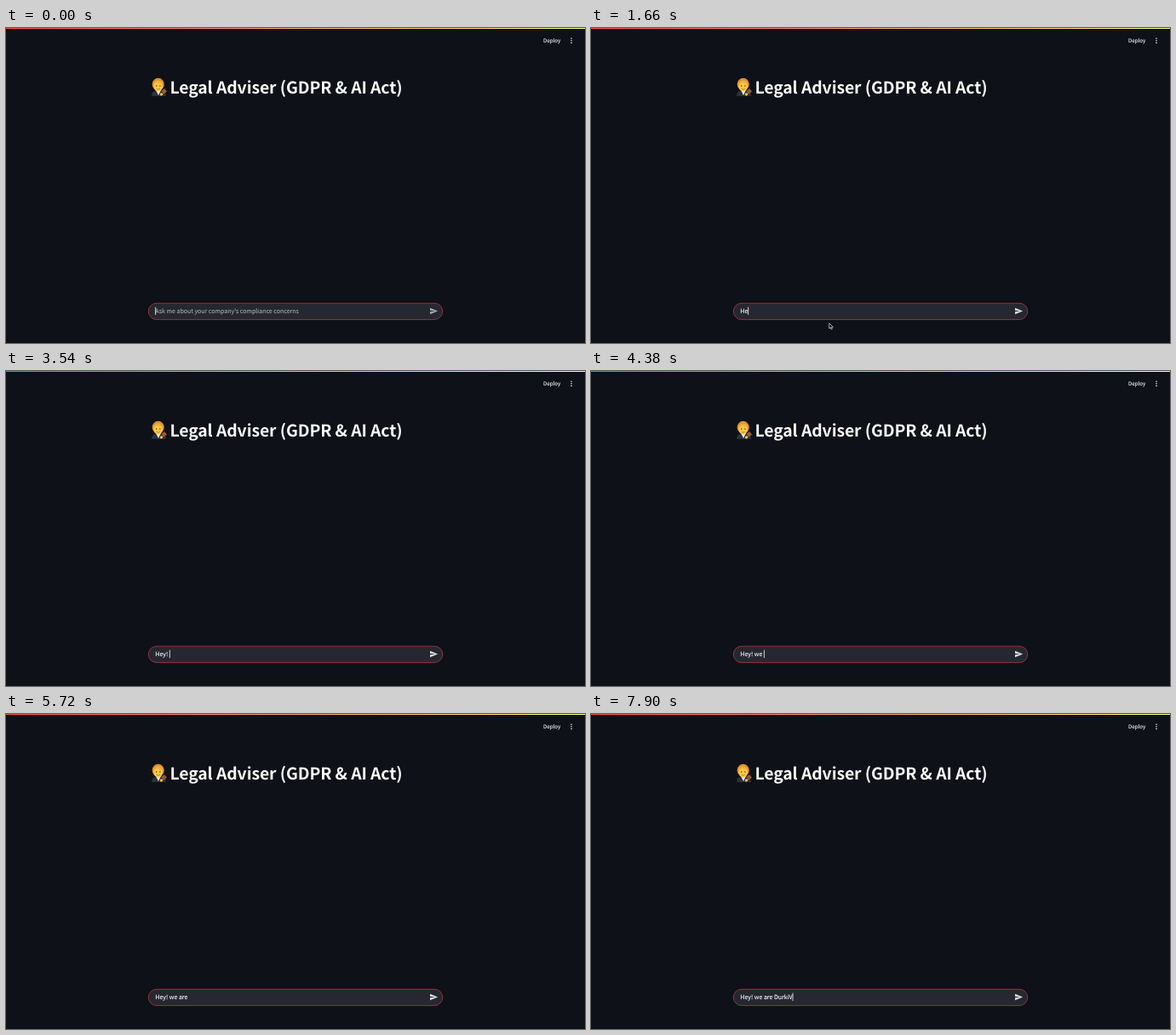
Animation, 680 px wide and 370 px high, one loop 8 s. Source, as an HTML page:

```html
<!DOCTYPE html>
<html lang="en">
<head>
<meta charset="utf-8">
<title>Legal Adviser</title>
<style>
  html, body { margin: 0; width: 100%; height: 100%; overflow: hidden; background: #0e1117; }
  svg { display: block; width: 680px; height: 370px; }
  text {
    font-family: "Noto Sans CJK JP", "Noto Sans CJK SC", "Noto Sans CJK KR", "Noto Sans CJK TC", "Noto Sans CJK", "Open Sans", sans-serif;
    fill: #fafafa; text-rendering: geometricPrecision; white-space: pre;
  }
  .small { stroke: #fafafa; stroke-width: .12px; }
</style>
</head>
<body>
<svg viewBox="0 0 680 370">
  <defs>
    <linearGradient id="bar">
      <stop stop-color="#ff4b4b"/>
      <stop offset="1" stop-color="#fffd80"/>
    </linearGradient>
  </defs>
  <rect width="680" height="370" fill="#0e1117"/>
  <rect width="680" height="1" fill="url(#bar)"/>

  <text class="small" x="631" y="17" font-size="6.16">Deploy</text>
  <g fill="#e6e6e8">
    <circle cx="664" cy="12.2" r=".8"/>
    <circle cx="664" cy="14.8" r=".8"/>
    <circle cx="664" cy="17.4" r=".8"/>
  </g>

  <!-- judge emoji -->
  <path d="M171 80c0-5 3-7 8.500-7s8.500 2 8.500 7z" fill="#2b303a"/>
  <path d="M176 73l3 6 3-6z" fill="#e8e8ea"/>
  <ellipse cx="178.700" cy="66" rx="7.100" ry="7.200" fill="#dd932c"/>
  <ellipse cx="178.700" cy="68.500" rx="5.300" ry="6" fill="#ffc843"/>
  <path d="M173 66.500c1-6 9-7 11.500-1-4 .5-6-1.500-7-1.500s-2 2-4.500 2.500z" fill="#f0ae40"/>
  <g fill="#57391c">
    <circle cx="176.700" cy="68" r=".8"/>
    <circle cx="180.900" cy="68" r=".8"/>
  </g>
  <path d="M176.800 71.500q1.900 1.300 3.800 0" fill="none" stroke="#8a5a22" stroke-width=".7"/>
  <path d="M182.500 74l3.500-3 3 3.500-3.500 3z" fill="#a0582f"/>
  <path d="M185 76l-3.500 3.500" stroke="#a0582f" stroke-width="1.500"/>
  <circle cx="182.500" cy="77.800" r="1.600" fill="#ffc843"/>

  <text x="192.500" y="77" font-size="19.360" font-weight="700" letter-spacing="-.1">Legal Adviser (GDPR &amp; AI Act)</text>

  <rect x="167.250" y="323.250" width="345.500" height="19.200" rx="9.600" fill="#262730" stroke="#f0494b" stroke-width=".55"/>
  <text id="entry" class="small" x="175.300" y="334.700" font-size="7.020"></text>
  <rect id="caret" y="327.700" width=".8" height="9.300" fill="#fafafa"/>
  <path id="send" d="M498 328.700L507.200 332.500 498 336.300V333.300L504 332.500 498 331.700z"/>
  <path id="pointer" d="M0 0V6.300L1.500 5 2.500 7.200 3.500 6.700 2.600 4.600H4.500z" fill="#0b0c10" stroke="#e8e8e8" stroke-width=".7"/>
</svg>
<script>
const LOOP = 8000;
const HINT = "Ask me about your company's compliance concerns";
const MESSAGE = "Hey! we are DurkiV";
// moment at which each character of MESSAGE appears
const KEYS = [860, 1660, 2600, 3360, 3540, 3920, 4220, 4380, 4560, 4840,
              5040, 5220, 6020, 6260, 6440, 7260, 7740, 7900];
const BLINK = 500, FIRST_BLINK = 400;
const [entry, caret, send, pointer] =
  ["entry", "caret", "send", "pointer"].map(id => document.getElementById(id));

let shown;
function setText(count) {
  if (count === shown) return;
  shown = count;
  entry.textContent = count ? MESSAGE.slice(0, count) : HINT;
  entry.style.fill = entry.style.stroke = count ? "#fafafa" : "#a5a6ab";
  send.style.fill = count ? "#dcdce0" : "#a5a6ab";
}

function setCaret(t, count) {
  const on = count ? Math.floor((t - KEYS[count - 1]) / BLINK) % 2 === 0 : t < FIRST_BLINK;
  const width = count ? entry.getComputedTextLength() : 0;
  caret.setAttribute("x", 175.3 + width);
  caret.style.visibility = on ? "visible" : "hidden";
}

function setPointer(t) {
  const step = Math.min(7, Math.floor((t - 220) / 60));
  const rest = (1 - step / 7) ** 2;
  pointer.setAttribute("transform", `translate(${279.8 - 32 * rest} ${346.7 + 23 * rest})`);
  pointer.style.visibility = t >= 220 && t < 2660 ? "visible" : "hidden";
}

function draw(t) {
  const count = KEYS.filter(k => k <= t).length;
  setText(count);
  setCaret(t, count);
  setPointer(t);
}

const start = performance.now();
function frame() {
  draw((performance.now() - start) % LOOP);
  requestAnimationFrame(frame);
}
frame();
</script>
</body>
</html>
```
